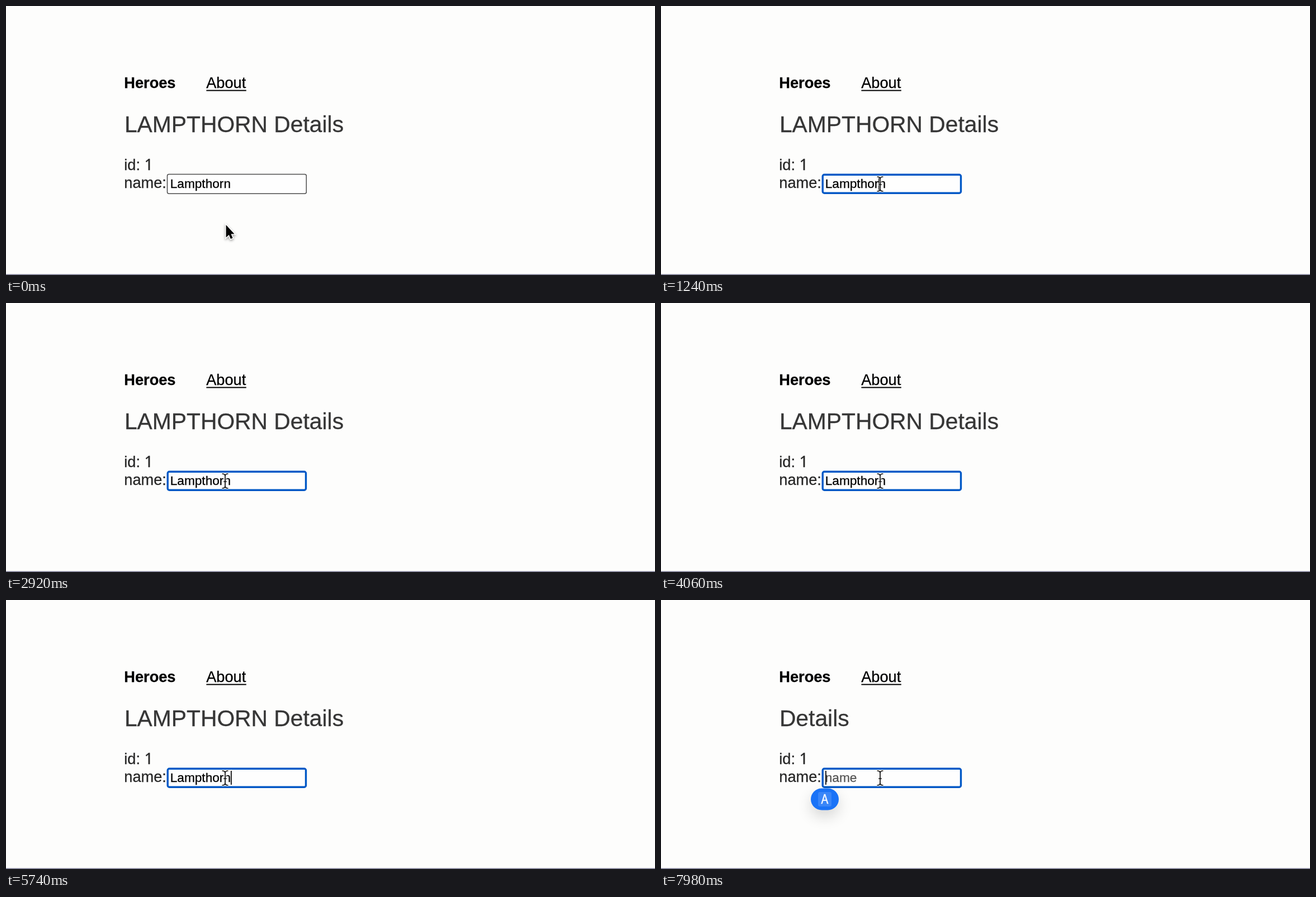
Recreate the animation shown at these times as an HTML page with a canvas. Size 1161x482 px, loop 8 s.

```html
<!DOCTYPE html>
<html lang="en">
<head>
<meta charset="utf-8">
<title>Hero details</title>
<style>
  html, body { margin: 0; width: 100%; height: 100%; overflow: hidden; background: #fdfdfc; }
  canvas { display: block; }
</style>
</head>
<body>
<canvas id="stage" width="1161" height="482"></canvas>
<script>
const ctx = document.getElementById('stage').getContext('2d');
const LOOP = 8000;
const SANS = '"Liberation Sans", Arial, sans-serif';
const BODY = `27.2px ${SANS}`;
const TITLE = `40.8px ${SANS}`;
const FIELD = `22.67px ${SANS}`;
const DIGIT = '27.2px "Noto Sans", sans-serif';
const NAME = 'Lampthorn';
const LEFT = 211.3;
const FIELD_X = 293.7;

// Times in ms
const FOCUS = 860;
const CARET_TO_END = 5340;
const CLEAR = 6160;
const BADGE = 7820;
const BLINK = 560;

// A hairline stroke gives the text its slightly heavier weight.
function text(str, x, y, font, color) {
  ctx.font = font;
  ctx.fillStyle = ctx.strokeStyle = color;
  ctx.lineWidth = 0.3;
  ctx.fillText(str, x, y);
  ctx.strokeText(str, x, y);
}

function box(x, y, w, h, r) {
  ctx.beginPath();
  ctx.roundRect(x, y, w, h, r);
}

function drawPage(name) {
  ctx.fillStyle = '#fdfdfc';
  ctx.fillRect(0, 0, 1161, 482);
  ctx.fillStyle = '#74748e';
  ctx.fillRect(0, 480.6, 1161, 1.4);

  text('Heroes', LEFT, 147, `bold ${BODY}`, '#000');
  text('About', 358.2, 147, BODY, '#000');
  ctx.fillRect(358.4, 150.4, 71.4, 2);

  text(`${name.toUpperCase()} Details`.trim(), LEFT + 0.6, 226, TITLE, '#363636');
  text('id:', LEFT, 294, BODY, '#262626');
  text('1', 247.6, 294, DIGIT, '#262626');
  text('name:', LEFT, 326, BODY, '#262626');
}

function drawField(name, focused) {
  ctx.fillStyle = '#fefefe';
  ctx.strokeStyle = focused ? '#0058c6' : '#4c4c4c';
  ctx.lineWidth = focused ? 3.4 : 1.5;
  if (focused) box(289.2, 302.2, 247.3, 33, 3);
  else box(288.5, 301.5, 248.8, 34.8, 3);
  ctx.fill();
  ctx.stroke();
  text(name || 'name', FIELD_X, 326, FIELD, name ? '#000' : '#555');
}

function drawCaret(t, name) {
  if (t < FOCUS) return;
  // The blink restarts with its dark half once the field is cleared.
  const phase = t < CLEAR ? t - FOCUS : t - CLEAR + BLINK;
  if (Math.floor(phase / BLINK) % 2) return;
  const end = t < CARET_TO_END ? -1 : name.length;
  ctx.font = FIELD;
  const x = FIELD_X + ctx.measureText(name.slice(0, end)).width;
  ctx.fillStyle = '#000';
  ctx.fillRect(Math.round(x), 306, 1.7, 25);
}

function drawArrow(x, y) {
  const points = [[0, 0], [0, 22.5], [5.2, 17.6], [8.3, 25], [12, 23.5], [8.9, 16.3], [15, 16.3]];
  ctx.save();
  ctx.translate(x, y);
  ctx.beginPath();
  points.forEach(([px, py]) => ctx.lineTo(px, py));
  ctx.closePath();
  ctx.lineJoin = 'miter';
  ctx.lineWidth = 3;
  ctx.strokeStyle = '#fff';
  ctx.shadowColor = 'rgba(0,0,0,.4)';
  ctx.shadowBlur = 4;
  ctx.shadowOffsetY = 2;
  ctx.stroke();
  ctx.shadowColor = 'transparent';
  ctx.fillStyle = '#000';
  ctx.fill();
  ctx.restore();
}

function drawBeam(x, y) {
  ctx.save();
  ctx.translate(x, y);
  ctx.beginPath();
  for (const s of [-1, 1]) {
    ctx.moveTo(-5.5, 13 * s);
    ctx.quadraticCurveTo(0, 13 * s, 0, 9 * s);
    ctx.quadraticCurveTo(0, 13 * s, 5.5, 13 * s);
  }
  ctx.moveTo(0, -10);
  ctx.lineTo(0, 10);
  ctx.moveTo(-2.8, 1);
  ctx.lineTo(2.8, 1);
  ctx.lineWidth = 3.6;
  ctx.strokeStyle = 'rgba(255,255,255,.85)';
  ctx.stroke();
  ctx.lineWidth = 1.7;
  ctx.strokeStyle = '#111';
  ctx.stroke();
  ctx.restore();
}

function drawPointer(t) {
  if (t >= 840) return drawBeam(392, 319);
  const p = Math.pow(t / 840, 1.75);
  drawArrow(393.6 - 2 * p, 392.3 - 72 * p);
}

function drawBadge(t) {
  if (t < BADGE) return;
  const p = Math.min(1, (t - BADGE + 40) / 160);
  const scale = 0.6 + 0.4 * p;
  ctx.save();
  ctx.globalAlpha = p;
  ctx.translate(293, 357);
  ctx.scale(scale, scale);
  ctx.shadowColor = 'rgba(0,0,0,.16)';
  ctx.shadowBlur = 26;
  ctx.shadowOffsetY = 11;
  ctx.fillStyle = '#1a73f7';
  box(-25, -19.5, 50, 39, 19.5);
  ctx.fill();
  ctx.shadowColor = 'transparent';
  ctx.fillStyle = 'rgba(255,255,255,.14)';
  box(-12, -13, 24, 26, 3);
  ctx.fill();
  ctx.textAlign = 'center';
  text('A', 0, 8.3, '23px "Noto Sans Mono", monospace', '#f4f8ff');
  ctx.restore();
}

function render(t) {
  const name = t < CLEAR ? NAME : '';
  drawPage(name);
  drawField(name, t >= FOCUS);
  drawCaret(t, name);
  drawBadge(t);
  drawPointer(t);
}

const start = performance.now();
function tick() {
  render((performance.now() - start) % LOOP);
  requestAnimationFrame(tick);
}
tick();
</script>
</body>
</html>
```
